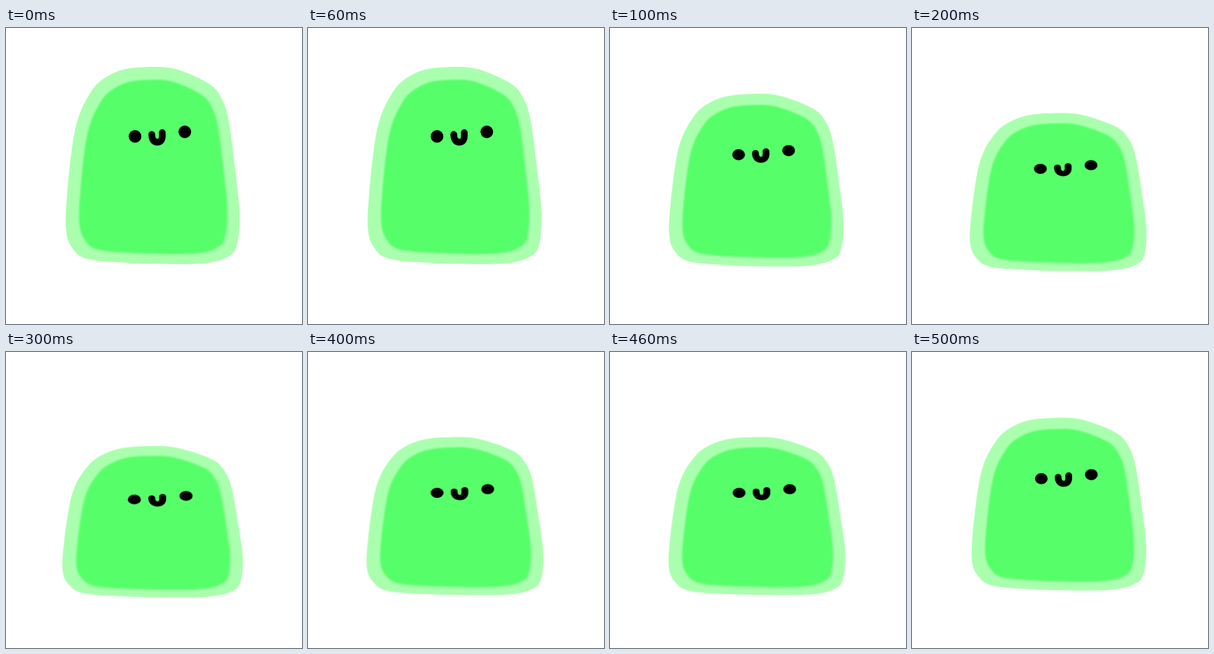
An HTML page for the animation above (0.6 s loop, 440 by 440 pixels).

```html
<!DOCTYPE html>
<html lang="en">
<head>
<meta charset="utf-8">
<title>Jelly</title>
<style>
  html, body { margin: 0; width: 100%; height: 100%; overflow: hidden; background: #fff; }
  svg { display: block; width: 440px; height: 440px; }
  #jelly { transform-origin: 0 0; }
</style>
</head>
<body>
<svg viewBox="0 0 440 440">
  <defs>
    <path id="body"/>
    <filter id="soft"><feGaussianBlur stdDeviation="1.3"/></filter>
    <filter id="ink" x="-30%" y="-30%" width="160%" height="160%"><feGaussianBlur stdDeviation="0.6"/></filter>
  </defs>
  <g id="jelly">
    <use href="#body" fill="#aaffae"/>
    <g filter="url(#soft)">
      <use href="#body" fill="#56ff69" transform="translate(108 77) scale(.853 .884) translate(-88 -58)"/>
    </g>
    <g filter="url(#ink)">
      <circle cx="191.8" cy="161.2" r="9.4"/>
      <circle cx="265.8" cy="154.3" r="9.4"/>
      <path d="M216.7 158.3C216.7 165 219.5 169.8 225 169.8C231.5 169.8 233 164 232.3 155.5"
        fill="none" stroke="#000" stroke-width="10" stroke-linecap="round"/>
    </g>
  </g>
</svg>
<script>
const outline = [
  [210, 58], [252, 61], [302, 83], [321, 106], [331, 138], [340, 205], [347, 275],
  [343, 324], [328, 341], [300, 349], [255, 351], [180, 349], [120, 343], [98, 326],
  [89, 298], [91, 245], [99, 172], [108, 132], [122, 102], [139, 80], [170, 63]
];

// Closed Catmull-Rom curve through the points
function smooth(pts) {
  const n = pts.length;
  const at = i => pts[(i + n) % n];
  let d = `M${pts[0]}`;
  for (let i = 0; i < n; i++) {
    const [a, b, c, e] = [at(i - 1), at(i), at(i + 1), at(i + 2)];
    const p = [0, 1].map(k => b[k] + (c[k] - a[k]) / 6);
    const q = [0, 1].map(k => c[k] - (e[k] - b[k]) / 6);
    d += `C${p} ${q} ${c}`;
  }
  return d + 'Z';
}

// Squash over one loop: t runs from 0 to 1, fully squashed at one half
function pose(t) {
  const u = 1 - Math.abs(1 - 2 * t);
  const top = 58 + 82 * (1 - (1 - u) ** 1.65);
  const bottom = 351 + 14 * Math.sin(u * Math.PI / 2) ** 2;
  const sx = 1 + 0.038 * u * u;
  const sy = (bottom - top) / 293;
  const mid = 218 - 0.6 * Math.sin(2 * Math.PI * t);
  return `matrix(${sx}, 0, 0, ${sy}, ${mid - 218 * sx}, ${top - 58 * sy})`;
}

const $ = id => document.getElementById(id);
$('body').setAttribute('d', smooth(outline));

const count = 6;
const steps = Array.from({ length: count + 1 }, (_, i) => ({
  offset: i / count, transform: pose(i / count), easing: 'steps(1, end)'
}));
$('jelly').animate(steps, { duration: 600, iterations: Infinity });
</script>
</body>
</html>
```
